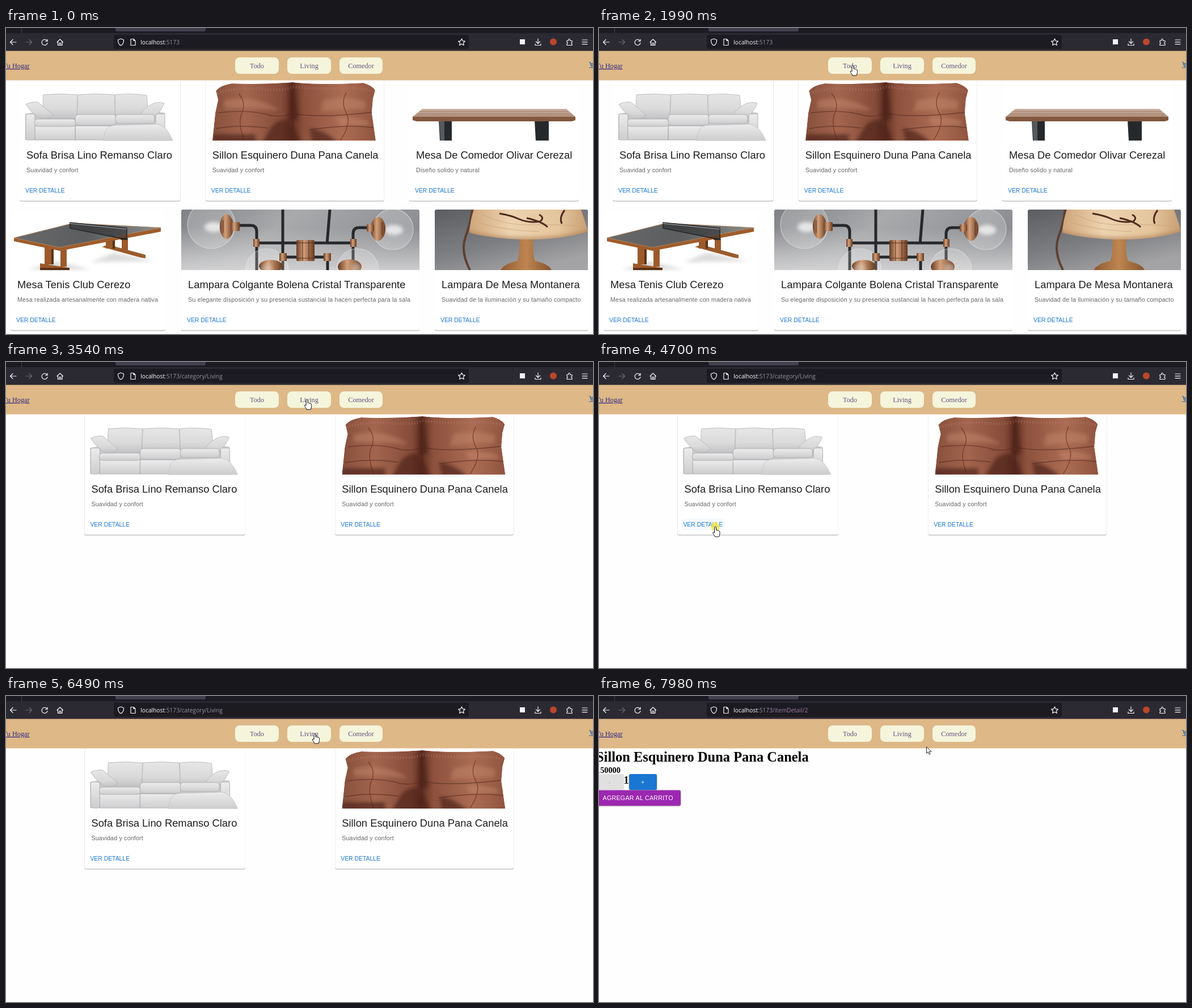
Write an HTML page that moves like this. It is 1035 px wide and 541 px high and loops after 8 s.

```html
<!DOCTYPE html>
<html lang="es">
<head>
<meta charset="utf-8">
<title>Tienda</title>
<style>
  html, body { margin: 0; width: 100%; height: 100%; overflow: hidden; background: #fefefe; }
  svg { display: block; }
  text { white-space: pre; }
  .card { fill: #fff; filter: drop-shadow(0 1px .6px rgba(0,0,0,.32)) drop-shadow(0 0 .6px rgba(0,0,0,.1)); }
  .sans { font-family: "Liberation Sans", Arial, sans-serif; }
  .serif { font-family: "Liberation Serif", "Times New Roman", serif; }
  .title { font-size: 18.35px; fill: #1d1d1d; }
  .desc { font-size: 10.7px; letter-spacing: .17px; fill: #666; }
  .more { font-size: 10.4px; fill: #1976d2; }
  .nav { font-size: 12.23px; fill: #655382; text-anchor: middle; }
  .bold { font-weight: bold; fill: #000; }
  .btn { filter: drop-shadow(0 1px 1px rgba(0,0,0,.35)); }
  .soft { filter: blur(3px); }
  .url { font: 10.2px "Open Sans", "Noto Sans", sans-serif; }
  .icon { fill: none; stroke: #f4f4f8; stroke-width: 1.2; stroke-linecap: round; stroke-linejoin: round; }
</style>
</head>
<body>
<svg width="1035" height="541" viewBox="0 0 1035 541">
  <defs>
    <linearGradient id="linen" x2="0" y2="1"><stop stop-color="#e6e6e6"/><stop offset=".6" stop-color="#dadadb"/><stop offset="1" stop-color="#c3c3c5"/></linearGradient>
    <linearGradient id="seat" x2="0" y2="1"><stop stop-color="#ececec"/><stop offset="1" stop-color="#cdcdcf"/></linearGradient>
    <linearGradient id="rust"><stop stop-color="#87503c"/><stop offset=".2" stop-color="#a2654e"/><stop offset=".42" stop-color="#874d3a"/><stop offset=".49" stop-color="#643225"/><stop offset=".56" stop-color="#8c513d"/><stop offset=".8" stop-color="#ab6c53"/><stop offset="1" stop-color="#90543f"/></linearGradient>
    <linearGradient id="plank" x2="0" y2="1"><stop stop-color="#c9ae9d"/><stop offset="1" stop-color="#b08f7b"/></linearGradient>
    <linearGradient id="slate"><stop stop-color="#696a6a"/><stop offset=".5" stop-color="#5b5d5e"/><stop offset="1" stop-color="#8b8b89"/></linearGradient>
    <linearGradient id="wall" x2="1" y2=".3"><stop stop-color="#808185"/><stop offset=".45" stop-color="#a9aaac"/><stop offset="1" stop-color="#8c8d91"/></linearGradient>
    <linearGradient id="haze" x2="0" y2="1"><stop offset=".3" stop-color="#d8d8d9" stop-opacity="0"/><stop offset="1" stop-color="#dcdcdd" stop-opacity=".8"/></linearGradient>
    <linearGradient id="brass"><stop stop-color="#6a3d24"/><stop offset=".4" stop-color="#d3a07a"/><stop offset="1" stop-color="#66391f"/></linearGradient>
    <linearGradient id="dusk" x2=".6" y2="1"><stop stop-color="#5b5d61"/><stop offset=".6" stop-color="#7f8084"/><stop offset="1" stop-color="#a3a3a5"/></linearGradient>
    <linearGradient id="maple"><stop stop-color="#cfa57a"/><stop offset=".35" stop-color="#ecd3b0"/><stop offset=".75" stop-color="#e5c59c"/><stop offset="1" stop-color="#c99f74"/></linearGradient>
    <linearGradient id="stem"><stop stop-color="#8d5a34"/><stop offset=".5" stop-color="#be8550"/><stop offset="1" stop-color="#875531"/></linearGradient>
    <radialGradient id="glow"><stop stop-color="#efe23a" stop-opacity=".85"/><stop offset=".65" stop-color="#efe544" stop-opacity=".75"/><stop offset="1" stop-color="#f3ea62" stop-opacity=".1"/></radialGradient>
    <clipPath id="couchClip"><path id="couchShape" d="M370 111Q378 101 398 98Q450 100 506 96Q560 101 630 97Q645 101 651 110L647 125L645 150L652 199H364L369 150L374 127Z"/></clipPath>
    <clipPath id="lampClip"><path d="M309 428V324a3 3 0 0 1 3-3H726a3 3 0 0 1 3 3V428Z"/></clipPath>
    <clipPath id="woodClip"><path d="M756 428V324a3 3 0 0 1 3-3H1023a3 3 0 0 1 3 3V428Z"/></clipPath>
    <clipPath id="shadeClip"><path id="shadeShape" d="M825 321H1014Q1022 345 1026 360Q980 374 920 374Q860 373 817 362Q818 341 825 321Z"/></clipPath>

    <g id="sofa">
      <path d="M34 152L66 146H252L280 150V198H34Z" fill="#cacacc"/>
      <g fill="url(#linen)" stroke="#b3b3b5" stroke-width=".8">
        <path d="M66 118Q96 115 126 118L125 160H64Z"/><path d="M127 118Q160 115 191 118L193 160H125Z"/>
        <path d="M192 118Q222 115 248 119L252 160H193Z"/>
        <path d="M35 135Q44 130 56 131Q70 142 83 154Q74 161 63 161Q47 154 35 135Z"/>
        <path d="M279 133Q266 129 255 136Q243 143 238 151Q248 160 260 160Q272 150 279 133Z"/>
      </g>
      <g fill="url(#seat)" stroke="#acacae" stroke-width=".9">
        <rect x="35" y="152" width="16" height="46" rx="3"/><rect x="264" y="152" width="16" height="44" rx="3"/>
        <path d="M51 173H122V198H51ZM122 173H193V198H122Z"/>
        <rect x="50" y="161" width="73" height="13" rx="6"/><rect x="122" y="153" width="72" height="19" rx="6"/>
        <rect x="193" y="153" width="69" height="16" rx="6"/>
        <path d="M171 199L175 184Q178 171 196 172L266 170Q283 172 294 199Z" stroke="#c6c6c8"/>
      </g>
    </g>

    <g id="couch" clip-path="url(#couchClip)">
      <use href="#couchShape" fill="url(#rust)"/>
      <g class="soft" fill="#4a2118" opacity=".65">
        <path d="M452 202L470 172Q496 150 509 178L520 202Z"/><path d="M364 188H440V202H364ZM536 178Q560 180 585 202H540Z"/>
        <path d="M500 96H508L516 160L498 168Z"/>
      </g>
      <path class="soft" d="M385 128Q430 120 460 134T470 145Q430 140 385 142ZM560 128Q600 118 635 130L632 144Q590 142 555 148ZM580 160Q610 156 638 164L640 172H590Z" fill="#c58b70" opacity=".45"/>
      <path d="M506 98Q500 130 507 181M374 150Q430 143 468 155Q490 158 505 150M507 151Q550 160 645 149M370 178Q410 170 462 177M535 180Q600 170 648 176M410 116Q424 132 416 150T420 198M600 114Q590 132 600 150T590 198" fill="none" stroke="#4d241a" stroke-width="1.4" opacity=".55"/>
      <path d="M372 115Q410 104 450 108T506 104Q550 109 590 107T649 113" fill="none" stroke="#c08670" stroke-width="5" stroke-dasharray="2 3" opacity=".3"/>
    </g>

    <g id="dining">
      <path d="M763 163H786V199H765ZM932 163H957V199H934Z" fill="#26292c"/>
      <path d="M764 164H773V199H766Z" fill="#555a5f"/>
      <path d="M734 143H988L1004 157H717Z" fill="url(#plank)"/>
      <path d="M728 147.500H992M724 152H998" stroke="#8d6750" opacity=".45"/>
      <path d="M717 157H1004V163L998 165H724L717 163Z" fill="#83583f"/>
    </g>

    <g id="pingpong">
      <path class="soft" d="M90 412L150 427H40ZM190 397L262 412L150 414Z" fill="#ddd"/>
      <g fill="#9c5a2b">
        <path d="M68 384H80V418H68ZM96 384H107V422H96ZM60 416L112 424V428H60ZM176 366H188V390H176ZM204 366H215V394H204ZM169 387L180 383L246 401V407L238 406Z"/>
      </g>
      <path d="M80 386H84V418H80ZM188 368H192V390H188ZM60 424H112V428H60Z" fill="#5c3216"/>
      <path d="M14 371L94 387L273 353V360L95 394L14 377Z" fill="#a05c2b"/>
      <path d="M14 371L118 345L273 353L94 388Z" fill="url(#slate)" stroke="#b88a62" stroke-width=".8"/>
      <path d="M113 344L213 354V374L113 354Z" fill="#2d2f32" opacity=".6"/>
      <path d="M113 344L213 354V374L113 354Z" fill="none" stroke="#222428" stroke-width="1.500"/>
      <path d="M113 345.500L213 355.500" stroke="#d0d0d0" stroke-width=".8"/>
      <path d="M202 373H211" stroke="#222" stroke-width="3"/>
    </g>

    <g id="pendant" clip-path="url(#lampClip)">
      <path d="M309 321H729V428H309Z" fill="url(#wall)"/><path d="M309 321H729V428H309Z" fill="url(#haze)"/>
      <g fill="none" stroke="#26282b" stroke-width="5">
        <path d="M412 349H432Q442 349 442 360V428M645 353H622Q612 353 612 364V428M488 321V428M571 321L566 382M447 380H608M567 405V428M540 405H567M488 405H516"/>
      </g>
      <g fill="#fff" fill-opacity=".2" stroke="#e4e4e5" stroke-opacity=".6" stroke-width="1.200">
        <circle cx="362" cy="348" r="42"/><circle cx="682" cy="356" r="36"/><circle cx="460" cy="428" r="38"/><circle cx="620" cy="427" r="37"/>
      </g>
      <g class="soft" fill="#fff" opacity=".7"><ellipse cx="366" cy="352" rx="16" ry="9"/><ellipse cx="684" cy="357" rx="16" ry="9"/></g>
      <g fill="url(#brass)">
        <ellipse cx="389" cy="351" rx="12" ry="22"/><rect x="396" y="343" width="16" height="16" rx="2"/>
        <ellipse cx="656" cy="355" rx="13" ry="21"/><rect x="636" y="347" width="13" height="13" rx="2"/>
        <rect x="512" y="375" width="32" height="37" rx="2"/><rect x="436" y="373" width="11" height="14"/><rect x="607" y="373" width="11" height="14"/>
        <rect x="482" y="398" width="13" height="14"/><rect x="560" y="398" width="13" height="14"/>
        <ellipse cx="467" cy="421" rx="21" ry="11"/><ellipse cx="606" cy="422" rx="21" ry="13"/>
      </g>
      <path d="M523 375V412M534 375V412M512 380H544M512 407H544M383 340V362M663 343V367" stroke="#54301d"/>
      <g class="soft" fill="#e8d8cb" opacity=".5"><circle cx="460" cy="426" r="10"/><circle cx="618" cy="426" r="10"/></g>
    </g>

    <g id="tablelamp" clip-path="url(#woodClip)">
      <path d="M756 321H1026V428H756Z" fill="url(#dusk)"/>
      <path d="M822 321Q819 345 810 370T818 428" fill="none" stroke="#5d402f" stroke-width="4"/>
      <path d="M905 366H930Q928 400 933 412Q957 417 962 428H872Q878 417 901 412Q907 400 905 366Z" fill="url(#stem)"/>
      <use href="#shadeShape" fill="url(#maple)"/>
      <g clip-path="url(#shadeClip)">
        <path class="soft" d="M810 357Q860 370 920 370T1030 356V380H810Z" fill="#a97b52" opacity=".6"/>
        <path d="M840 330Q880 350 930 348T1020 352M835 345Q880 358 940 360" fill="none" stroke="#c39a6d" opacity=".6"/>
        <path d="M870 328Q890 331 905 338T942 342Q950 335 940 330M918 336Q945 342 955 352M985 322Q975 335 980 346" fill="none" stroke="#4c2c1d" stroke-width="3"/>
      </g>
    </g>

    <path id="hand" d="M-1.500 1.400Q0-.800 1.500 1.400V6.400Q3 5.500 4 7Q5.500 6.200 6.300 7.700Q8 7.400 8 9.500V12.500Q7.800 15 6.500 18H-.500Q-1.300 15.700-3 13.700L-4.500 10.800Q-3.500 8.900-1.500 10.800Z" fill="#fff" stroke="#111" stroke-linejoin="round"/>
    <path id="arrow" d="M.5.700V12.300L3.200 9.800L5.100 14.200L7.100 13.300L5.200 9.100H8.900Z" fill="#fff" stroke="#111" stroke-width=".9"/>
  </defs>

  <rect width="1035" height="541" fill="#fefefe"/>
  <g id="page"></g>

  <rect y="40" width="1035" height="52.500" fill="#deb887"/>
  <g id="navbar" class="serif">
    <text x="41.500" y="71" class="nav" style="fill:#302884;text-anchor:end;text-decoration:underline">Tu Hogar</text>
  </g>
  <path d="M1028 60.500H1030L1031.500 66.500H1035M1030.500 62.500H1035M1031 64.500H1035M1032 68.300H1034M1028 70H1035" fill="none" stroke="#2d62a8" stroke-width="1.200"/>

  <rect width="1035" height="40.500" fill="#2b2a33"/>
  <rect width="1035" height="9" fill="#1c1b22"/>
  <path d="M27.500 0V9" stroke="#42414d"/>
  <rect x="193" y="-4" width="159" height="10" rx="3" fill="#42414d"/>
  <rect x="190" y="12" width="626" height="25" rx="3" fill="#1c1b22"/>
  <g class="icon">
    <path d="M18 25H8M12 20.500L7.500 25L12 29.500"/>
    <path d="M35 25H45M41 20.500L45.500 25L41 29.500" stroke="#6b6a74"/>
    <path d="M72.500 23A5 5 0 1 0 73 26.500M73 20V23.500H69.500"/>
    <path d="M90 25L95.200 20L100.500 25M91.500 24.500V30.500H99V24.500M94 30.500V26.500H96.500V30.500"/>
    <path d="M202.500 19L207.500 21Q208 28 202.500 31Q197 28 197.500 21Z"/>
    <path d="M220 19.500H225L228 22.500V30.500H220ZM225 19.500V22.500H228"/>
    <path d="M803.500 19L805.300 22.800L809.500 23.300L806.400 26.200L807.200 30.400L803.500 28.300L799.800 30.400L800.600 26.200L797.500 23.300L801.700 22.800Z"/>
    <path d="M938 19V27M934.500 24L938 27.500L941.500 24M933 28V30.500H943V28"/>
    <path d="M989 22.500H991.500V20.500Q993 18 994.500 20.500V22.500H998V25.500Q995 26.500 998 28V30.500H989V28Q992 26.500 989 25.500Z"/>
    <path d="M1016 21H1025M1016 24.800H1025M1016 28.600H1025"/>
  </g>
  <rect x="906" y="20" width="9" height="9" fill="#f4f4f8"/>
  <circle cx="965" cy="24.500" r="6" fill="#b9472b"/>
  <text x="237.300" y="29" class="url" fill="#fbfbfe">localhost<tspan fill="#94939f">:5173</tspan><tspan id="path"></tspan></text>

  <circle id="click" r="9.500" fill="url(#glow)"/>
  <use id="cursor"/>
</svg>
<script>
const el = id => document.getElementById(id);
const LOOP = 8000;

const items = {
  sofa: { x: 24, w: 283.5, title: "Sofa Brisa Lino Remanso Claro", desc: "Suavidad y confort" },
  couch: { x: 351.8, w: 315, title: "Sillon Esquinero Duna Pana Canela", desc: "Suavidad y confort" },
  dining: { x: 711, w: 299, title: "Mesa De Comedor Olivar Cerezal", desc: "Diseño solido y natural" },
  pingpong: { x: 8, y: 321, w: 273, title: "Mesa Tenis Club Cerezo", desc: "Mesa realizada artesanalmente con madera nativa" },
  pendant: { x: 309, y: 321, w: 420, title: "Lampara Colgante Bolena Cristal Transparente", desc: "Su elegante disposición y su presencia sustancial la hacen perfecta para la sala" },
  tablelamp: { x: 756, y: 321, w: 270, title: "Lampara De Mesa Montanera", desc: "Suavidad de la iluminación y su tamaño compacto" }
};

function card(id, dx = 0) {
  const { x, y = 92, w, title, desc } = items[id];
  return `<g class="sans" transform="translate(${dx})">
    <rect class="card" x="${x}" y="${y}" width="${w}" height="213.500" rx="3"/>
    <use href="#${id}"/>
    <rect class="hover" x="${x + 7}" y="${y + 185}" width="77" height="21" rx="3" fill="#1976d2" opacity="0"/>
    <text class="title" x="${x + 12}" y="${y + 139}">${title}</text>
    <text class="desc" x="${x + 12}" y="${y + 162.5}">${desc}</text>
    <text class="more" x="${x + 10}" y="${y + 199}">VER DETALLE</text></g>`;
}

function detail(id, price) {
  return `<g class="serif bold">
    <text x="-5" y="116" font-size="24.460">${items[id].title}</text>
    <text x="-5" y="135.500" font-size="14.300">${price}</text>
    <text x="43.500" y="155" font-size="18.350">1</text></g>
    <rect x="-5" y="138" width="49" height="28" rx="3" fill="#e0e0e0"/>
    <rect class="btn" x="53" y="138" width="49" height="28" rx="3" fill="#1976d2"/>
    <rect class="btn" x="-6" y="166.500" width="150" height="27.500" rx="3" fill="#9c27b0"/>
    <g class="sans" font-size="10.700" fill="#fff">
      <text x="17" y="156" fill="#a6a6a6">-</text><text x="74" y="156">+</text>
      <text x="6.500" y="184.300" letter-spacing=".27">AGREGAR AL CARRITO</text></g>`;
}

const all = { path: "", body: Object.keys(items).map(id => card(id)).join("") };
const living = {
  path: "/category/Living", tint: "#94939f",
  body: card("sofa", 114.4) + card("couch", 228.4),
  links: [[145, 222], [587, 664]]
};
const first = { path: "/itemDetail/1", tint: "#9a7f9f", body: detail("sofa", "500000") };
const second = { path: "/itemDetail/2", tint: "#9a7f9f", body: detail("couch", "150000") };

const views = [[0, all], [3540, living], [4770, first], [6490, living], [7520, second]];
const clicks = [[2340, 2500], [3410, 3470], [4700, 4770], [6350, 6490], [7450, 7520]];
const navLinks = [[404, 481, "Todo"], [496, 573, "Living"], [588, 664, "Comedor"]];

// start, end, number of steps, destination x and y
const moves = [
  [310, 640, 6, 569, 246], [970, 1660, 11, 447, 67], [1860, 1990, 2, 447.5, 66],
  [3010, 3210, 4, 530.7, 66], [3820, 4570, 12, 205, 291], [5300, 6080, 12, 539, 67],
  [6150, 6150, 1, 544.5, 66], [6690, 7450, 12, 616, 285.5], [7780, 7980, 4, 577, 89]
];

el("navbar").insertAdjacentHTML("beforeend", navLinks.map(([a, b, label]) =>
  `<rect x="${a}" y="52" width="${b - a}" height="29" rx="8" fill="#f5f5dc"/>
   <text class="nav" x="${(a + b) / 2}" y="71">${label}</text>`).join(""));

function pointer(t) {
  let x = 1142, y = 655;
  for (const [start, end, n, tx, ty] of moves) {
    if (t < start) break;
    const done = t >= end ? n : 1 + Math.floor((t - start) / (end - start) * (n - 1));
    const k = 1 - (1 - done / n) ** 2;
    x += (tx - x) * k;
    y += (ty - y) * k;
  }
  return [x, y];
}

const inside = (spans, x) => spans.findIndex(([a, b]) => x >= a && x <= b);
let shown;

function draw(t) {
  const view = views.filter(v => t >= v[0]).pop()[1];
  if (view !== shown) {
    shown = view;
    el("page").innerHTML = view.body;
    el("path").textContent = view.path;
    el("path").setAttribute("fill", view.tint || "#94939f");
  }
  const [x, y] = pointer(t);
  const link = view.links && y > 276 && y < 299 ? inside(view.links, x) : -1;
  const onNav = y > 52 && y < 80 && inside(navLinks, x) >= 0;
  document.querySelectorAll(".hover").forEach((r, i) => r.setAttribute("opacity", i === link ? .04 : 0));
  const at = `translate(${x} ${y})`;
  el("cursor").setAttribute("href", onNav || link >= 0 ? "#hand" : "#arrow");
  el("cursor").setAttribute("transform", at);
  el("click").setAttribute("transform", at);
  el("click").style.display = clicks.some(([a, b]) => t >= a && t < b) ? "" : "none";
}

const began = performance.now();
function frame() {
  draw((performance.now() - began) % LOOP);
  requestAnimationFrame(frame);
}
frame();
</script>
</body>
</html>
```
